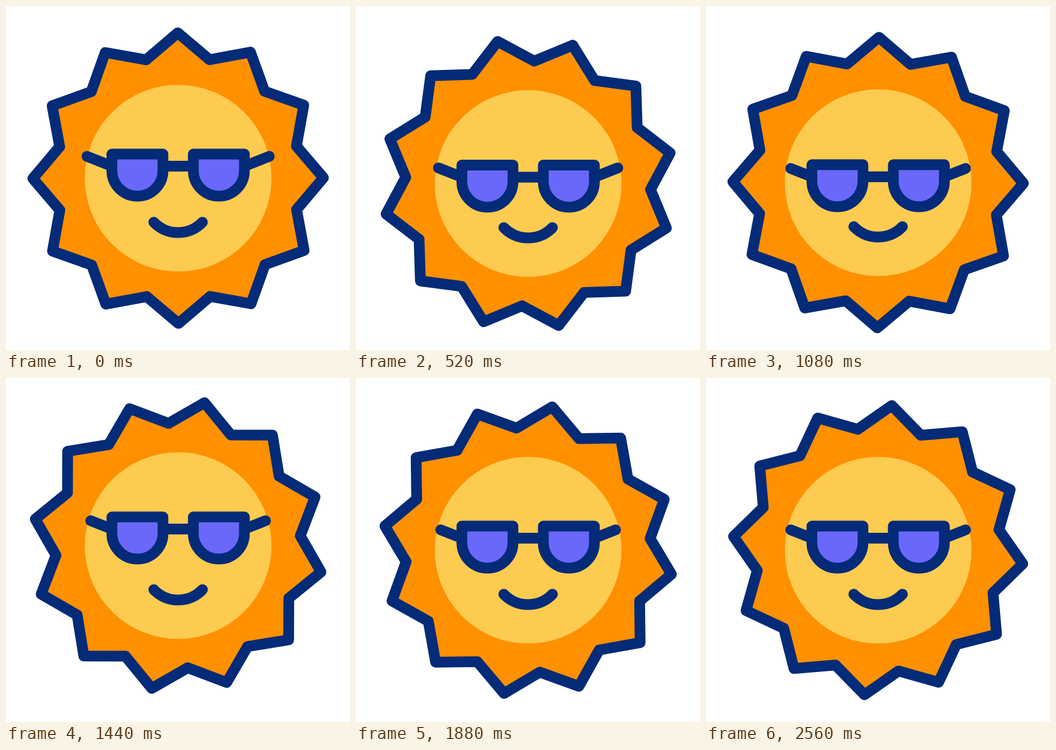
These frames come from a looping animation (640 by 640 pixels, 2600 ms). An HTML page with a canvas:

```html
<!DOCTYPE html>
<html lang="en">
<head>
<meta charset="utf-8">
<title>Sun with sunglasses</title>
<style>
  html, body { margin: 0; width: 100%; height: 100%; overflow: hidden; background: #fff; }
  canvas { display: block; width: 100vmin; height: 100vmin; }
</style>
</head>
<body>
<canvas id="stage" width="640" height="640"></canvas>
<script>
const ctx = document.getElementById('stage').getContext('2d');
const LOOP = 2600;
const CENTER = 320.25;
const NAVY = '#032b77', ORANGE = '#ff9000', YELLOW = '#fdcb50', LENS = '#6a67fb';

// [time in ms, vertical offset in px]
const BODY_BOUNCE = [[0, 0], [105, -9], [367, 20], [814, -18], [1140, 10.5], [1475, -9], [1720, 0]];
const GLASSES_BOUNCE = [[0, 0], [105, -9], [367, 20.8], [814, -18], [1140, 14], [1475, -9], [1720, 0]];
const ARM_PULL = [[0, 0], [400, 0], [690, 1]];

function valueAt(keys, t) {
  for (let i = 1; i < keys.length; i++) {
    const [t0, v0] = keys[i - 1], [t1, v1] = keys[i];
    if (t < t1) {
      const ease = (1 - Math.cos(Math.PI * (t - t0) / (t1 - t0))) / 2;
      return v0 + (v1 - v0) * ease;
    }
  }
  return keys[keys.length - 1][1];
}

function line(x0, y0, x1, y1) {
  ctx.beginPath();
  ctx.moveTo(x0, y0);
  ctx.lineTo(x1, y1);
  ctx.stroke();
}

function drawRays(angle) {
  ctx.beginPath();
  for (let i = 0; i < 24; i++) {
    const radius = i % 2 ? 228 : 270.3;
    const a = angle + i * Math.PI / 12;
    ctx.lineTo(CENTER + radius * Math.sin(a), CENTER - radius * Math.cos(a));
  }
  ctx.closePath();
  ctx.fillStyle = ORANGE;
  ctx.fill();
  ctx.stroke();
}

function drawFace() {
  ctx.beginPath();
  ctx.arc(CENTER, 320.4, 173.7, 0, 2 * Math.PI);
  ctx.fillStyle = YELLOW;
  ctx.fill();

  const half = 46 * Math.PI / 180;
  ctx.beginPath();
  ctx.arc(CENTER, 358.6, 62.9, Math.PI / 2 - half, Math.PI / 2 + half);
  ctx.stroke();
}

function drawGlassesHalf(armPull) {
  line(150.7 + 7 * armPull, 279.7 + 2.8 * armPull, 197, 298);
  ctx.beginPath();
  ctx.moveTo(197, 275.5);
  ctx.lineTo(292, 275.5);
  ctx.lineTo(292, 306.3);
  ctx.arc(244.5, 306.3, 47.5, 0, Math.PI);
  ctx.closePath();
  ctx.fillStyle = LENS;
  ctx.fill();
  ctx.stroke();
}

function drawGlasses(armPull) {
  line(292, 298, 348.5, 298);
  drawGlassesHalf(armPull);
  ctx.save();
  ctx.translate(2 * CENTER, 0);
  ctx.scale(-1, 1);
  drawGlassesHalf(armPull);
  ctx.restore();
}

function draw(now) {
  const t = now % LOOP;
  ctx.fillStyle = '#fff';
  ctx.fillRect(0, 0, 640, 640);
  ctx.strokeStyle = NAVY;
  ctx.lineWidth = 20;
  ctx.lineCap = ctx.lineJoin = 'round';

  ctx.save();
  ctx.translate(0, valueAt(BODY_BOUNCE, t));
  drawRays(-2 * Math.PI * t / LOOP);
  drawFace();
  ctx.translate(0, valueAt(GLASSES_BOUNCE, t));
  drawGlasses(valueAt(ARM_PULL, t));
  ctx.restore();
}

function tick() {
  draw(performance.now());
  requestAnimationFrame(tick);
}
tick();
</script>
</body>
</html>
```
